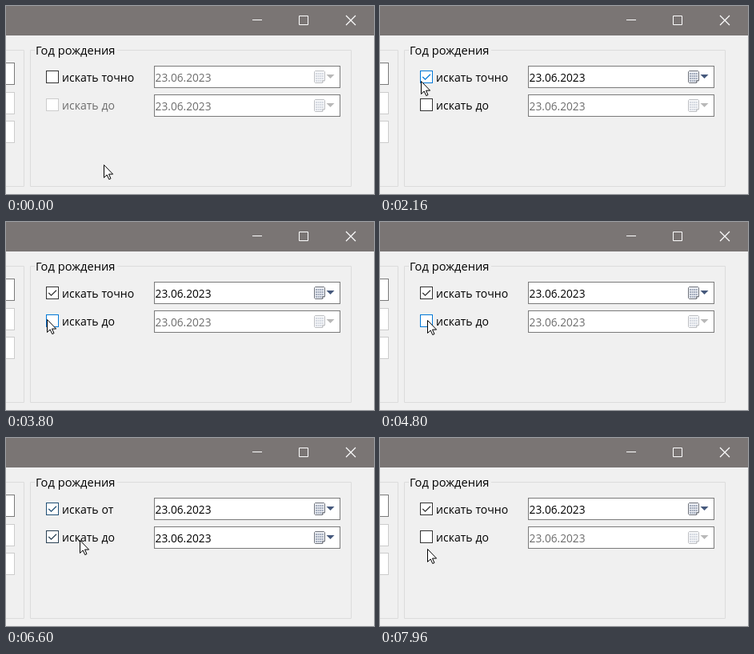
Write an HTML page that moves like this. It is 460 px wide and 236 px high and loops after 8000 ms.

```html
<!DOCTYPE html>
<html lang="ru">
<head>
<meta charset="utf-8">
<title>Год рождения</title>
<style>
html, body { margin: 0; width: 100%; height: 100%; overflow: hidden; background: #f0f0f0; }
svg { display: block; width: 100%; height: 100%; }
text { font: 14.1px "Open Sans", "Noto Sans", sans-serif; fill: #000; }
.title { font-size: 14.7px; }
.date { font-size: 13.7px; }
.frame { fill: none; stroke: #dcdcdc; }
.input { fill: #fff; stroke: #7a7a7a; }
.input.dim { stroke: #ccc; }
.caption { fill: none; stroke: #fff; }
.arrow { fill: #45587c; }
.off text { fill: #6d6d6d; }
.off .icon { opacity: .45; }
.off .arrow { fill: #b8b8b8; }
</style>
</head>
<body>
<svg viewBox="0 0 460 236">
  <defs>
    <g id="calendar">
      <path d="M1.5.5H12.5L13.5 1.5V12.5L10.5 15.5H1.5L.5 14.5V1.5Z" fill="#eceef3" stroke="#70747c"/>
      <path d="M2 4H12M2 7H12M2 10H12M2 13H10" stroke="#a3acbd" stroke-width="2" stroke-dasharray="2 .6"/>
      <path d="M10.5 15.5V12.5H13.5" fill="#d5d8de" stroke="#70747c"/>
    </g>
  </defs>
  <rect width="460" height="236" fill="#f0f0f0"/>
  <rect width="460" height="37" fill="#7a7574"/>
  <path class="caption" d="M308 17.5H320M366.5 12.5H377.5V23.5H366.5Z"/>
  <path class="caption" stroke-width="1.2" d="M425 12L437 24M437 12L425 24"/>
  <path class="frame" d="M0 55.5H22.5V226.5H0M36 55.5H30.5V226.5H431.5V55.5H139"/>
  <rect class="input" x="-9.5" y="71.5" width="20" height="27"/>
  <rect class="input dim" x="-9.5" y="108.5" width="20" height="27"/>
  <rect class="input dim" x="-9.5" y="144.5" width="20" height="27"/>
  <text class="title" x="37" y="61">Год рождения</text>
  <g id="rows"></g>
  <circle id="spot" r="15" fill="#ff0" fill-opacity=".55"/>
  <path id="cursor" d="M.5.5V16.5L4.2 13L6.8 18.6L9 17.6L6.5 12.1H11.6Z" fill="#fff" stroke="#000"/>
</svg>
<script>
const LOOP = 8000, TICK = 40;
const HOLD = 140;                  // how long the button stays down
const LAG = 40, FADE_STEPS = 5;    // hover highlight, in ticks

// Pointer moves: start, end, x, y
const home = [122, 199];
const moves = [
  [160, 1000, 54, 90],
  [2120, 2380, 14, 150], [2380, 2600, 91, 135], [2600, 2800, 41, 113], [2800, 3000, 54, 126],
  [3000, 3280, 55, 143], [3280, 3640, 54, 124],
  [3760, 3920, 34, 111], [3920, 4080, 54, 124], [4560, 4600, 59, 123],
  [4880, 5600, 141, 95], [5600, 5880, 118, 76], [5880, 6240, 141, 86],
  [6240, 6400, 129, 74], [6400, 6600, 92, 128], [6600, 6800, 36, 140], [6800, 7080, 54, 122],
  [7600, 7840, 59, 139]
];

const clicks = [
  { row: 0, down: 1160, done: 1360 },
  { row: 1, down: 4600, done: 4880 },
  { row: 1, down: 7400, done: 7640 }
];

const byId = id => document.getElementById(id);
const spot = byId('spot'), cursor = byId('cursor');
const rows = [0, 1].map(i => ({ boxY: 81 + 35 * i, fieldY: 75 + 36 * i }));

byId('rows').innerHTML = rows.map(({ boxY, fieldY }) => `
  <g>
    <g class="choice">
      <rect class="box" x="50.5" y="${boxY + .5}" width="15" height="15"/>
      <path class="tick" d="M53.3 ${boxY + 8}l3.2 3.2 6.5-6.5" fill="none" stroke-width="1.3"/>
      <text class="label" x="70" y="${boxY + 14}"></text>
    </g>
    <g class="field">
      <rect class="input" x="185.5" y="${fieldY + .5}" width="232" height="27"/>
      <text class="date" x="186.6" y="${fieldY + 20}">23.06.2023</text>
      <use class="icon" href="#calendar" x="385" y="${fieldY + 6}"/>
      <path class="arrow" d="M400.5 ${fieldY + 11}h10l-5 5z"/>
    </g>
  </g>`).join('');

[...byId('rows').children].forEach((g, i) => {
  for (const name of ['choice', 'box', 'tick', 'label', 'field'])
    rows[i][name] = g.querySelector('.' + name);
});

const ease = u => u * u * (3 - 2 * u);

function pointer(t) {
  let [x, y] = home;
  for (const [start, end, toX, toY] of moves) {
    if (t <= start) break;
    const u = ease(Math.min(1, (t - start) / (end - start)));
    x += (toX - x) * u;
    y += (toY - y) * u;
  }
  return [Math.round(x), Math.round(y)];
}

const checked = (row, t) =>
  clicks.filter(c => c.row === row && t >= c.done).length % 2 === 1;

function isOver({ boxY }, t) {
  const [x, y] = pointer(t);
  return x >= 50 && x < 165 && y >= boxY - 5 && y <= boxY + 18;
}

// Share of the last few ticks spent over the row
function hover(row, t) {
  let hits = 0;
  for (let i = 0; i < FADE_STEPS; i++) hits += isOver(row, t - LAG - i * TICK);
  return hits / FADE_STEPS;
}

const mix = (from, to, u) =>
  `rgb(${from.map((v, i) => Math.round(v + (to[i] - v) * u))})`;

function draw(t) {
  const [x, y] = pointer(t);
  const press = clicks.find(c => t >= c.down && t < c.down + HOLD);
  const on = rows.map((_, i) => checked(i, t));

  rows.forEach((row, i) => {
    const enabled = i === 0 || on[0];
    const pressed = press && press.row === i;
    let ink = mix([51, 51, 51], [0, 120, 215], hover(row, t));
    if (!enabled) ink = '#ccc';
    if (pressed) ink = '#005499';
    row.box.setAttribute('stroke', ink);
    row.box.setAttribute('fill', pressed ? '#cce4f7' : '#fff');
    row.tick.setAttribute('stroke', ink);
    row.tick.setAttribute('visibility', on[i] ? 'visible' : 'hidden');
    row.choice.classList.toggle('off', !enabled);
    row.field.classList.toggle('off', !on[i]);
  });
  rows[0].label.textContent = on[1] ? 'искать от' : 'искать точно';
  rows[1].label.textContent = 'искать до';

  spot.setAttribute('visibility', press ? 'visible' : 'hidden');
  spot.setAttribute('transform', `translate(${x - .5} ${y - .5})`);
  cursor.setAttribute('transform', `translate(${x} ${y})`);
}

const start = performance.now();
function frame() {
  const t = (performance.now() - start) % LOOP;
  draw(Math.floor(t / TICK) * TICK);
  requestAnimationFrame(frame);
}
frame();
</script>
</body>
</html>
```
